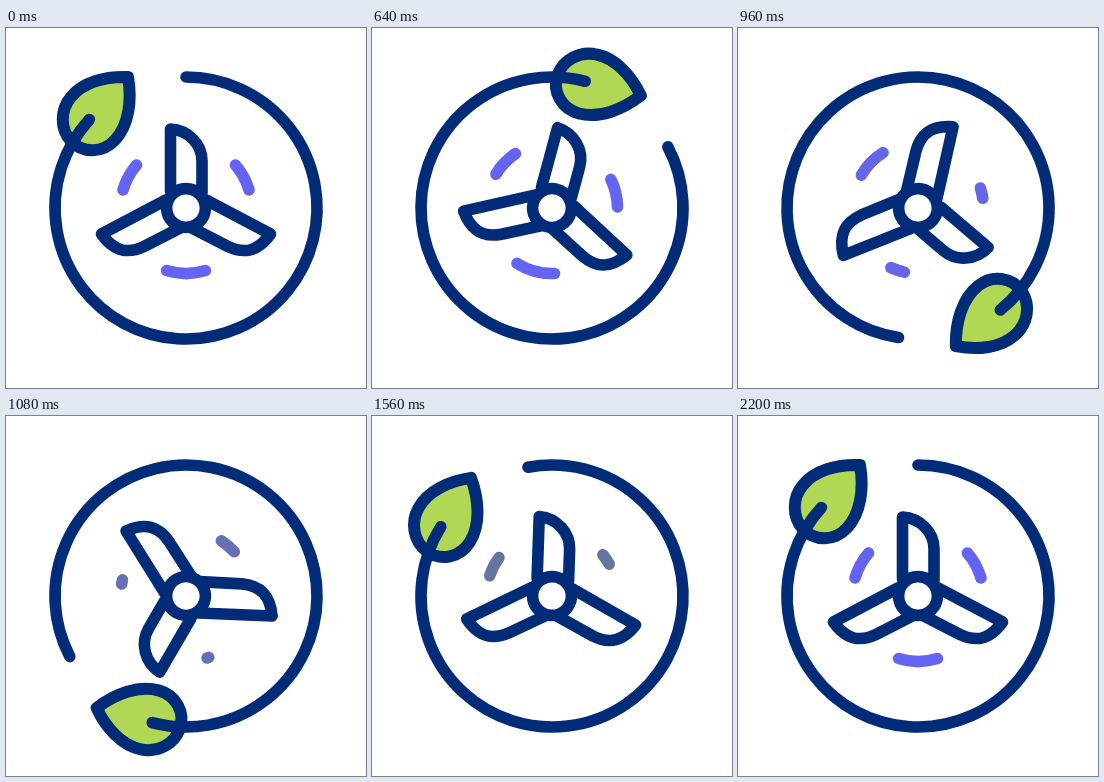
Animation of 360x360 px, one loop 2.24 s. Source, as an HTML page:

```html
<!DOCTYPE html>
<html lang="en">
<head>
<meta charset="utf-8">
<title>Wind energy</title>
<style>
  html, body { margin: 0; width: 100%; height: 100%; overflow: hidden; background: #fff; }
  svg { display: block; width: 100vw; height: 100vh; }
  path, circle { fill: none; stroke: #022b78; stroke-width: 11.6; stroke-linecap: round; stroke-linejoin: round; }
</style>
</head>
<body>
<svg viewBox="0 0 360 360">
  <g id="ring">
    <path style="fill:#b1d855;stroke-width:12" d="M122 49C100 48 77 54 65 69C54 82 54 101 65 113C77 126 97 125 109 112C123 97 126 72 122 49Z"/>
    <path id="arc"/>
  </g>
  <g id="fan">
    <path class="dash"/><path class="dash"/><path class="dash"/>
    <path d="M164.5 163V101C182 102 196 116 196 133V165"/>
    <path d="M200 172L264.5 206C253 222 240 227 222 218.5L185 199.5"/>
    <path d="M160 172L95.5 206C107 222 120 227 138 218.5L175 199.5"/>
    <circle cx="180" cy="180" r="19.4" style="fill:#fff"/>
  </g>
</svg>
<script>
const LOOP = 2240, STEP = 40, TRIM = 460;
const ring = document.getElementById('ring');
const fan = document.getElementById('fan');
const dashEls = document.querySelectorAll('.dash');

// Angles in degrees, clockwise from the top; hide and show are start times in ms.
const dashes = [
  { from: -74, to: -49, hide: 690, show: 1261 },
  { from: 49, to: 74, hide: 730, show: 1362 },
  { from: 162.7, to: 197.3, hide: 828, show: 1560 }
];

const clamp = x => Math.min(1, Math.max(0, x));
const span = (t, start, length) => clamp((t - start) / length);
const smooth = x => x * x * (3 - 2 * x);

// cubic-bezier(a, 0, b, 1), solved by bisection.
function ease(x, a, b) {
  let lo = 0, hi = 1;
  for (let i = 0; i < 24; i++) {
    const s = (lo + hi) / 2, r = 1 - s;
    if (3 * a * s * r * r + 3 * b * s * s * r + s ** 3 < x) lo = s;
    else hi = s;
  }
  return smooth(hi);
}

function arc(radius, from, to) {
  const point = deg => {
    const a = deg * Math.PI / 180;
    return (180 + radius * Math.sin(a)).toFixed(2) + ' ' + (180 - radius * Math.cos(a)).toFixed(2);
  };
  return `M${point(from)}A${radius} ${radius} 0 ${to - from > 180 ? 1 : 0} 1 ${point(to)}`;
}

function mix(a, b, k) {
  return `rgb(${a.map((v, i) => Math.round(v + (b[i] - v) * k))})`;
}

const turn = (el, deg) => el.setAttribute('transform', `rotate(${deg.toFixed(3)} 180 180)`);

function draw(t) {
  turn(ring, 360 * ease(span(t, 42, 1800), 0.58, 0.42));
  // The fan overshoots a little, then settles back.
  turn(fan, 366 * ease(span(t, 413, 1276), 0.566, 0.41) - 6 * smooth(span(t, 1689, 511)));

  const grey = smooth(span(t, 900, 260)) * (1 - smooth(span(t, 1600, 240)));
  const colour = mix([101, 99, 242], [104, 116, 160], grey);
  dashes.forEach((d, i) => {
    const size = d.to - d.from;
    const back = t >= d.show;
    const start = back ? 0 : smooth(span(t, d.hide, TRIM));
    const end = back ? smooth(span(t, d.show, TRIM)) : 1;
    const el = dashEls[i];
    el.style.stroke = colour;
    el.style.display = end - start > 0.003 ? '' : 'none';
    el.setAttribute('d', arc(65.5, d.from + size * start, d.from + size * end));
  });
}

document.getElementById('arc').setAttribute('d', arc(131, 0, 312.5));

const begin = performance.now();
function tick() {
  const t = Math.max(0, performance.now() - begin) % LOOP;
  draw(Math.floor(t / STEP) * STEP);
  requestAnimationFrame(tick);
}
tick();
</script>
</body>
</html>
```
